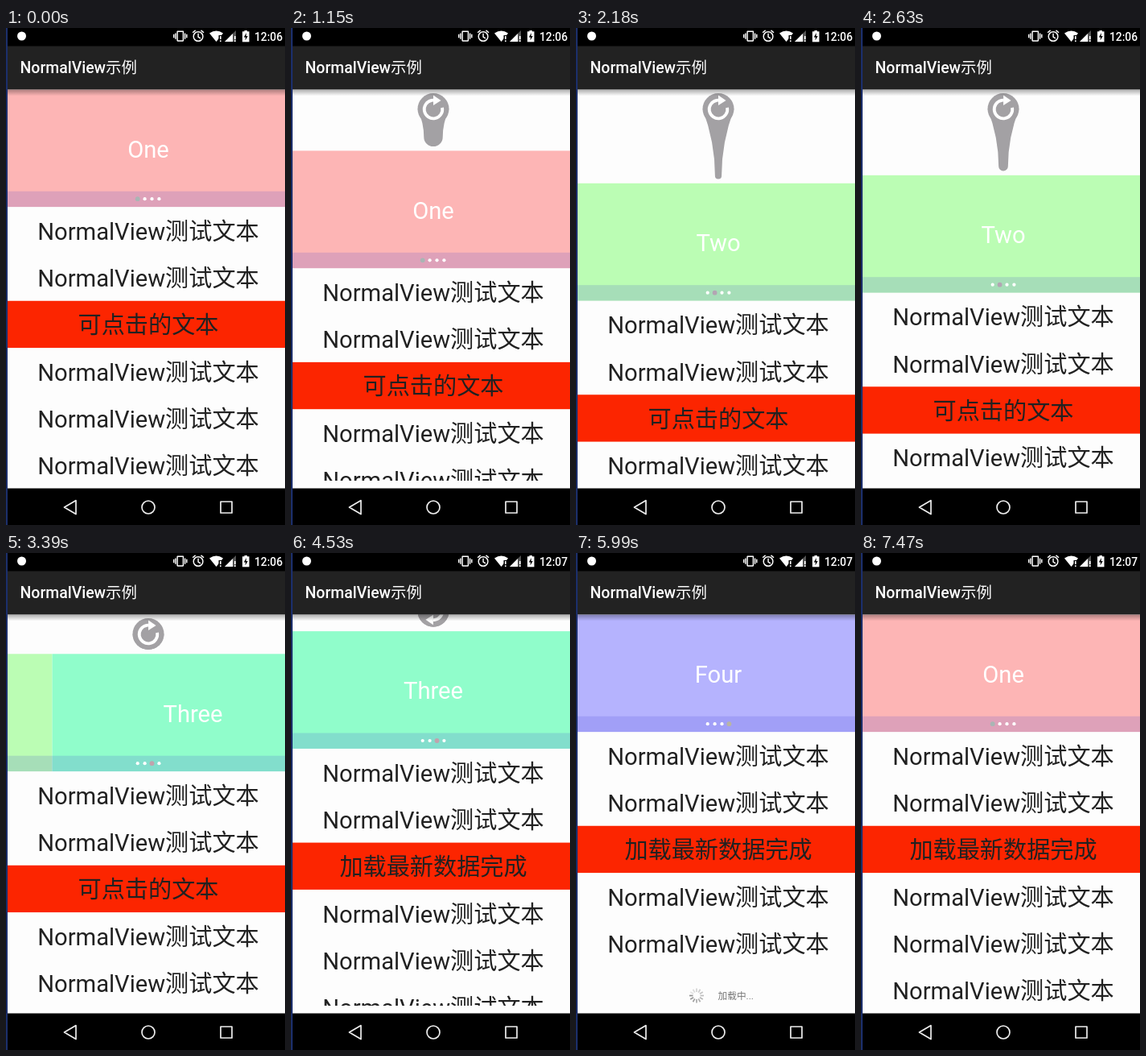
Recreate the animation shown at these times as an HTML page with a canvas. Size 347 by 617 pixels, loop 7940 ms.

```html
<!DOCTYPE html>
<html lang="zh">
<head>
<meta charset="utf-8">
<style>
  html, body { margin: 0; width: 100%; height: 100%; overflow: hidden; background: #000; }
  canvas { display: block; }
</style>
</head>
<body>
<canvas id="stage" width="347" height="617"></canvas>
<script>
const ctx = document.getElementById('stage').getContext('2d');
const LOOP = 7940, TAU = Math.PI * 2;
const LEFT = 2, WIDTH = 350, MID = 177, TOP = 76.3, ROW = 58.33, BANNER = 145.8;
const HEADER = 49, PAPER = '#fdfdfd', GREY = '#a3a1a4';
const FONT = 'Roboto, "Noto Sans CJK SC", "Noto Sans CJK", sans-serif';
const PAGES = [
  { name: 'One', color: '#fdb5b5', dot: '#a9b5b4' },
  { name: 'Two', color: '#bbfdb4', dot: '#b3a5b3' },
  { name: 'Three', color: '#90fdcb', dot: '#c0a3ad' },
  { name: 'Four', color: '#b5b3fe', dot: '#b9b5a4' }
];
const PAGE_TURNS = [1400, 3200, 5260, 6960];
const PULL = 830, RELEASE = 2500, SPIN = 2630, LOADED = 4240, COLLAPSE = 4257;
const FOOTER_ON = 5560, FOOTER_OFF = 6985;

const VIBRATE = new Path2D('M0 15h2V9H0v6zm3 2h2V7H3v10zm19-8v6h2V9h-2zm-3 8h2V7h-2v10zM16.5 3h-9C6.7 3 6 3.7 6 4.5v15c0 .8.7 1.5 1.5 1.5h9c.8 0 1.5-.7 1.5-1.5v-15c0-.8-.7-1.5-1.5-1.5zM16 19H8V5h8z');
const BELLS = new Path2D('M2.5 6.5L7.3 2.5M16.7 2.5L21.5 6.5M12 8v6l4 2.4M20 13a8 8 0 1 1-16 0a8 8 0 1 1 16 0');

const clamp = x => Math.min(1, Math.max(0, x));
const progress = (t, start, length) => clamp((t - start) / length);
const smooth = x => (1 - Math.cos(Math.PI * x)) / 2;
const quintOut = x => 1 - (1 - x) ** 5;

function rect(color, x, y, w, h) {
  ctx.fillStyle = color;
  ctx.fillRect(x, y, w, h);
}

function circle(color, x, y, r) {
  ctx.fillStyle = color;
  ctx.beginPath();
  ctx.arc(x, y, r, 0, TAU);
  ctx.fill();
}

function polygon(color, ...points) {
  ctx.fillStyle = color;
  ctx.beginPath();
  points.forEach(([x, y]) => ctx.lineTo(x, y));
  ctx.closePath();
  ctx.fill();
}

function text(str, x, y, size, color, align = 'center', weight = 400) {
  ctx.font = `${weight} ${size}px ${FONT}`;
  ctx.textAlign = align;
  ctx.fillStyle = color;
  ctx.fillText(str, x, y);
  return ctx.measureText(str).width;
}

function at(x, y, draw) {
  ctx.save();
  ctx.translate(x, y);
  draw();
  ctx.restore();
}

function clip(y, bottom, draw) {
  ctx.save();
  ctx.beginPath();
  ctx.rect(LEFT, y, WIDTH, bottom - y);
  ctx.clip();
  draw();
  ctx.restore();
}

function pullOffset(t) {
  if (t < PULL) return 0;
  const drag = 118 * (1 - Math.exp((PULL - Math.min(t, RELEASE)) / 310));
  if (t < RELEASE) return drag;
  const settled = drag + (HEADER - drag) * smooth(progress(t, RELEASE, 500));
  return settled * (1 - smooth(progress(t, COLLAPSE, 500)));
}

function drawRefresh(t, offset) {
  const stretch = Math.max(0, offset - HEADER);
  const r = 19.5, y = TOP + Math.min(offset, HEADER) - 24.8;
  const tail = r - 15.5 * Math.pow(stretch / 68, 0.75);
  const tailY = y + r + stretch - tail;
  const half = (y + tailY) / 2;

  circle(GREY, MID, y, r);
  ctx.beginPath();
  ctx.moveTo(MID - r, y);
  ctx.quadraticCurveTo(MID - tail, half, MID - tail, tailY);
  ctx.arc(MID, tailY, tail, Math.PI, 0, true);
  ctx.quadraticCurveTo(MID + tail, half, MID + r, y);
  ctx.fill();

  at(MID, y, () => {
    if (t > SPIN) ctx.rotate((t - SPIN) / 760 * TAU);
    ctx.strokeStyle = '#fff';
    ctx.lineWidth = 3.8;
    ctx.beginPath();
    ctx.arc(0, 0.5, 11.3, -0.2, -Math.PI / 2 + TAU);
    ctx.stroke();
    polygon('#fff', [0, -17], [9.5, -10.5], [0, -4.5]);
  });
}

function drawBanner(t, y) {
  const position = PAGE_TURNS.reduce((sum, start) => sum + quintOut(progress(t, start, 620)), 0);
  const first = Math.floor(position);
  for (let i = first; i <= first + 1; i++) {
    const page = PAGES[i % 4], x = (i - position) * WIDTH;
    rect(page.color, LEFT + x, y, WIDTH, BANNER);
    text(page.name, MID + x, y + 84.3, 29.17, '#fff');
  }
  rect('rgba(48,52,208,.15)', LEFT, y + BANNER - 19.4, WIDTH, 19.4);
  const selected = Math.ceil(position) % 4;
  PAGES.forEach((page, i) => {
    const active = i === selected;
    circle(active ? page.dot : '#fff', 163.7 + i * 8.9, y + 135.9, active ? 2.9 : 2.1);
  });
}

function drawList(t, y) {
  for (let i = 0; i < 6; i++) {
    const rowY = y + i * ROW, clickable = i === 2;
    const label = !clickable ? 'NormalView测试文本' : t < LOADED ? '可点击的文本' : '加载最新数据完成';
    if (clickable) rect('#fc2500', LEFT, rowY, WIDTH, ROW);
    text(label, MID, rowY + 40.6, 29.17, '#212121');
  }
}

function drawFooter(t) {
  rect(PAPER, LEFT, 526, WIDTH, 46);
  text('加载中...', 176.5, 553.5, 11.7, '#757575', 'left');
  const step = Math.floor((t - 6110) / 97.5);
  at(150, 549.5, () => {
    ctx.rotate(step * TAU / 12);
    ctx.lineWidth = 1.7;
    for (let i = 0; i < 12; i++) {
      ctx.strokeStyle = `rgba(120,120,120,${0.2 + i * 0.055})`;
      ctx.beginPath();
      ctx.moveTo(0, -4.5);
      ctx.lineTo(0, -9);
      ctx.stroke();
      ctx.rotate(TAU / 12);
    }
  });
}

function drawStatusBar(t) {
  rect('#000', LEFT, 0, WIDTH, 22.5);
  circle('#fff', 19.5, 10, 5.5);
  at(208, 1.3, () => {
    ctx.scale(0.73, 0.73);
    ctx.fillStyle = '#fff';
    ctx.fill(VIBRATE);
  });
  at(230.3, 1, () => {
    ctx.scale(0.73, 0.73);
    ctx.strokeStyle = '#fff';
    ctx.lineWidth = 2;
    ctx.stroke(BELLS);
  });

  ctx.fillStyle = '#fff';
  ctx.beginPath();
  ctx.moveTo(261.5, 17);
  ctx.lineTo(253, 6.5);
  ctx.quadraticCurveTo(261.5, 0.5, 270, 6.5);
  ctx.fill();
  rect('#000', 264.5, 9, 6, 9);
  rect('#fff', 266, 10, 1.6, 4);
  rect('#fff', 266, 15.3, 1.6, 1.7);

  polygon('#555', [272, 17], [286, 3], [286, 17]);
  polygon('#fff', [272, 17], [282, 7], [282, 17]);
  rect('#fff', 284, 10, 1.6, 4);
  rect('#fff', 284, 15.3, 1.6, 1.7);

  rect('#fff', 294, 4.3, 8.5, 13);
  rect('#fff', 296.5, 3, 3.5, 2);
  polygon('#000', [299, 6], [295.8, 11.5], [298, 11.5], [297.5, 15.5], [300.8, 10], [298.6, 10]);
  text(t < LOADED ? '12:06' : '12:07', 344, 15.5, 13.8, '#fff', 'right', 500);
}

function drawActionBar() {
  rect('#222', LEFT, 22, WIDTH, TOP - 22);
  const shadow = ctx.createLinearGradient(0, TOP, 0, TOP + 8);
  shadow.addColorStop(0, 'rgba(0,0,0,.32)');
  shadow.addColorStop(1, 'rgba(0,0,0,0)');
  rect(shadow, LEFT, TOP, WIDTH, 8);
  const w = text('NormalView', 17.5, 56, 19.44, '#fff', 'left', 500);
  text('示例', 17.5 + w, 56, 19.44, '#fff', 'left');
}

function drawNavBar() {
  rect('#000', LEFT, 571.5, WIDTH, 46);
  ctx.strokeStyle = '#eee';
  ctx.lineWidth = 1.7;
  ctx.lineJoin = 'round';
  ctx.beginPath();
  ctx.moveTo(87, 586.5);
  ctx.lineTo(72.5, 595);
  ctx.lineTo(87, 603.5);
  ctx.closePath();
  ctx.moveTo(185, 595);
  ctx.arc(MID, 595, 8, 0, TAU);
  ctx.rect(267, 588, 14, 14);
  ctx.stroke();
}

function draw(t) {
  const offset = pullOffset(t);
  rect('#1c2f6c', 0, 0, LEFT, 617);
  rect(PAPER, LEFT, 22, WIDTH, 550);
  clip(TOP, 562, () => {
    if (offset > 0) drawRefresh(t, offset);
    drawBanner(t, TOP + offset);
    drawList(t, TOP + BANNER + offset);
  });
  if (t >= FOOTER_ON && t < FOOTER_OFF) drawFooter(t);
  drawActionBar();
  drawStatusBar(t);
  drawNavBar();
}

const started = performance.now();
function tick() {
  draw((performance.now() - started) % LOOP);
  requestAnimationFrame(tick);
}
tick();
</script>
</body>
</html>
```
